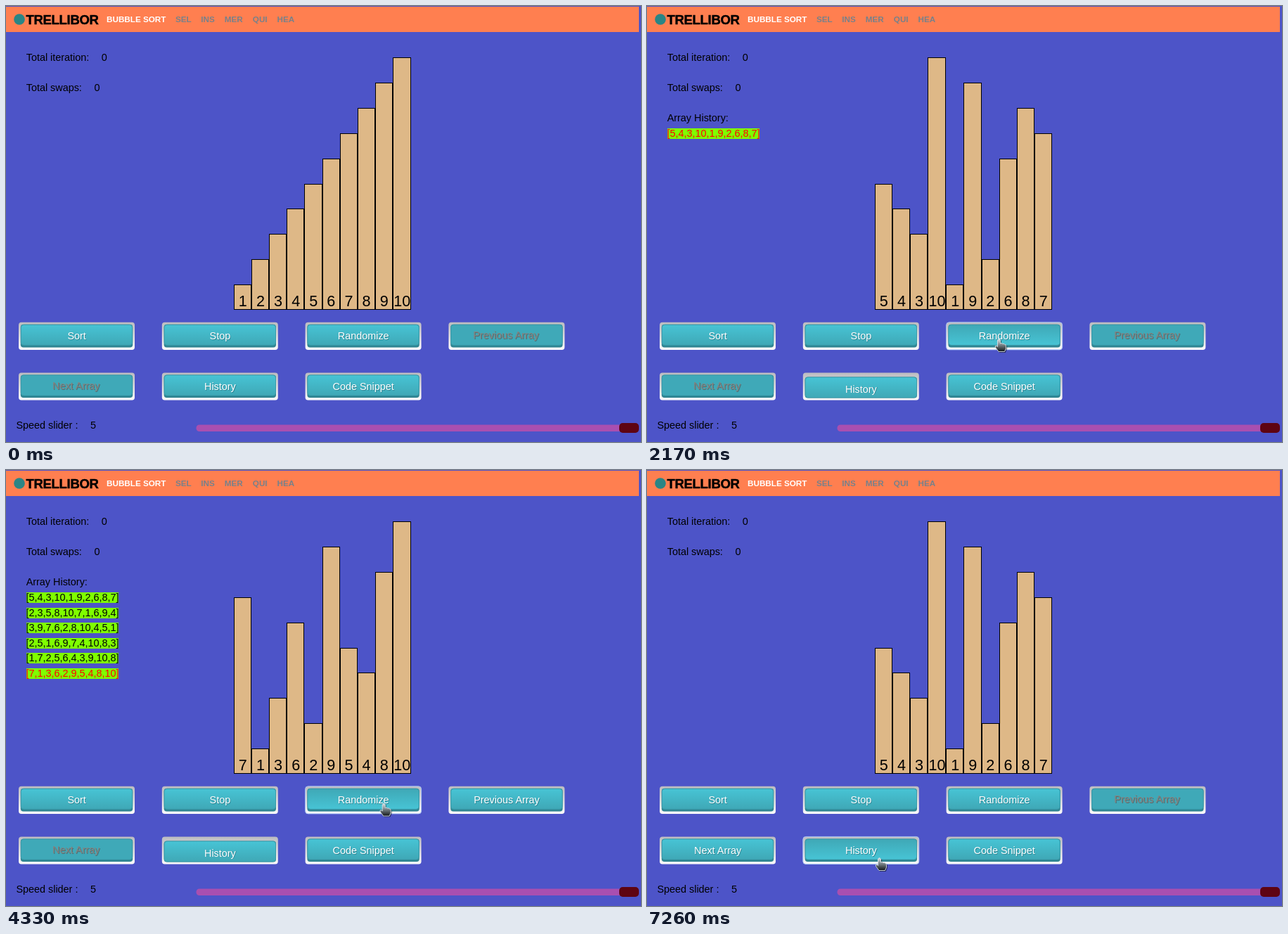
An HTML page for the animation above (8000 ms loop, 903 by 620 pixels).

```html
<!DOCTYPE html>
<html lang="en">
<head>
<meta charset="utf-8">
<title>Sorting visualizer</title>
<style>
  html, body { margin: 0; width: 903px; height: 620px; overflow: hidden; background: #4d54c8; }
  svg { display: block; font: 14.4px "Liberation Sans", Arial, sans-serif; }
  text { white-space: pre; }
  .mid { text-anchor: middle; }
  .nav { font-size: 11.7px; font-weight: bold; fill: #78818a; }
  .num { font-size: 21.6px; text-anchor: middle; }
  .brand { font-size: 18.5px; font-weight: bold; letter-spacing: -.3px; stroke: #000; stroke-width: .4; }
  .bar { fill: #deb887; stroke: #000; }
</style>
</head>
<body>
<svg width="903" height="620" viewBox="0 0 903 620">
  <defs>
    <linearGradient id="rim" x2="0" y2="1"><stop stop-color="#bcbcc0"/><stop offset="1" stop-color="#fafafa"/></linearGradient>
    <linearGradient id="up" x2="0" y2="1"><stop stop-color="#47c4d5"/><stop offset="1" stop-color="#3fa8b6"/></linearGradient>
    <linearGradient id="over" x2="0" y2="1"><stop stop-color="#3fa8b6"/><stop offset="1" stop-color="#47c4d5"/></linearGradient>
    <linearGradient id="glove" x2="0" y2="1"><stop stop-color="#dfe5e8"/><stop offset=".45" stop-color="#7d878c"/><stop offset="1" stop-color="#101416"/></linearGradient>
    <radialGradient id="spot"><stop stop-color="#e0e01c" stop-opacity=".85"/><stop offset=".8" stop-color="#cfe02c" stop-opacity=".7"/><stop offset="1" stop-color="#cfe02c" stop-opacity=".2"/></radialGradient>
  </defs>
  <path d="M0 1H900V37H0Z" fill="#ff7f50"/>
  <circle cx="19" cy="19" r="7.8" fill="#2b8585"/>
  <text class="brand" x="28.5" y="25.6">TRELLIBOR</text>
  <g class="nav">
    <text x="143" y="22.9" fill="#fff">BUBBLE SORT</text>
    <text x="241" y="22.9">SEL</text>
    <text x="277.3" y="22.9">INS</text>
    <text x="310.8" y="22.9">MER</text>
    <text x="350.8" y="22.9">QUI</text>
    <text x="385.6" y="22.9">HEA</text>
  </g>
  <text x="28.7" y="78">Total iteration:</text><text x="135.8" y="78">0</text>
  <text x="28.7" y="121">Total swaps:</text><text x="125.6" y="121">0</text>
  <text x="14.4" y="601.4">Speed slider :</text><text x="120" y="601.4">5</text>
  <rect x="270.5" y="595.5" width="629.5" height="9.5" rx="4.5" fill="#a94fb0"/>
  <rect x="872" y="593" width="28" height="14" rx="5" fill="#5e0412"/>
  <g id="scene"></g>
</svg>
<script>
const LOOP = 8000, TICK = 77.4;
const labels = ['Sort', 'Stop', 'Randomize', 'Previous Array', 'Next Array', 'History', 'Code Snippet'];
const [RANDOM, PREV, NEXT, HISTORY] = [2, 3, 4, 5];
const sorted = labels.concat(0, 0, 0).map((_, i) => i + 1);
const rows = ['5,4,3,10,1,9,2,6,8,7', '2,3,5,8,10,7,1,6,9,4', '3,9,7,6,2,8,10,4,5,1',
  '2,5,1,6,9,7,4,10,8,3', '1,7,2,5,6,4,3,9,10,8', '7,1,3,6,2,9,5,4,8,10'];

// Each press: time down, how long it is held; its effect comes on release.
const press = (down, held = 80) => ({ down, up: down + held });
const open = press(1310), close = press(7200, 60);
const shuffles = [press(2000, 170), press(2840), press(3240, 150), press(3480), press(3710), press(4020)];
const backs = [press(4710), press(5320), press(5640), press(6040, 150), press(6340)];
const presses = [open, ...shuffles, ...backs, close];
const released = (list, t) => list.filter(p => t >= p.up).length;

// The pointer glides from stop to stop; sag bends the way downwards.
const stops = [
  { x: 762, y: 602 },
  { from: 440, to: 1220, x: 292, y: 546 },
  { from: 1410, to: 1680, x: 501, y: 470 },
  { from: 4180, to: 4540, x: 710, y: 473 },
  { from: 6420, to: 7185, x: 331, y: 548, sag: 45 }
];
const clamp = u => Math.min(1, Math.max(0, u));
const ease = u => u < .5 ? 4 * u ** 3 : 1 - 4 * (1 - u) ** 3;

function pointer(t) {
  const s = 50 + Math.floor((t - 50) / TICK) * TICK;
  let { x, y } = stops[0];
  for (const p of stops.slice(1)) {
    const u = ease(clamp((s - p.from) / (p.to - p.from)));
    x += (p.x - x) * u;
    y += (p.y - y) * u + (p.sag || 0) * 4 * u * (1 - u);
  }
  return { x, y };
}

const corner = i => ({ x: 18 + 203.8 * (i % 4), y: i < 4 ? 449.8 : 521.4 });
const box = (x, y, w, h, look) => `<rect x="${x}" y="${y}" width="${w}" height="${h}" ${look}/>`;

function button(i, { off, hover, down, focus }) {
  const { x, y } = corner(i), top = y + (down ? 6 : 3);
  const face = off ? '#3fa9b8' : `url(#${hover ? 'over' : 'up'})`;
  const tx = x + 82.6, ty = y + 24.6 + (down ? 3.5 : 0);
  const label = (d, fill) => `<text class="mid" x="${tx + d}" y="${ty + d}" fill="${fill}">${labels[i]}</text>`;
  return box(x, y, 165, 39.2, 'rx="4" fill="url(#rim)"') +
    (focus ? box(x, y, 165, 39, 'rx="4" fill="none" stroke="#a9c4f5"') : '') +
    box(x + 2.8, top, 159.4, down ? 30 : 32.7, 'rx="4" fill="#2f8592"') +
    box(x + 3.3, top + .5, 158.4, 29, `rx="4" fill="${face}" stroke="#389baa" stroke-width=".8"`) +
    (off ? label(0, '#4d6e74') + label(-1, '#87827e') : label(.8, '#2f8592') + label(0, '#fff'));
}

function bars(list) {
  let s = '', left = 324;
  for (const n of list) {
    const right = left + (n > 9 ? 26 : 25.1);
    const x = Math.round(left), w = Math.round(right) - x, y = Math.round(432 - 35.9 * n);
    s += box(x + .5, y + .5, w - 1, 431 - y, 'class="bar"') +
      `<text class="num" x="${(left + right) / 2 + .3}" y="427.2">${n}</text>`;
    left = right;
  }
  return s;
}

function history(total, current) {
  return '<text x="28.7" y="164">Array History:</text>' + rows.slice(0, total).map((row, i) => {
    const y = Math.round(174 + 21.55 * i);
    return box(29, y, 131, 15, 'fill="#7fff00"') +
      `<text x="28.6" y="${y + 12}" fill="${i === current ? '#f00' : '#000'}">[${row}]</text>`;
  }).join('');
}

const HAND = 'M-2.5 5Q-.5 2 1.5 5V10Q3.5 8.5 4.8 10.5Q7 9.5 7.8 11.5Q9.5 11 9.5 13.5V17L7.5 21.5H-1L-5.5 15.5Q-6.5 12.5-4 13L-2.5 14.5Z';
const ARROW = 'M-.5-.5L16 10.5L8.5 12.5L4.8 20.8Z';

function cursor({ x, y }, hand, lit) {
  const shape = hand ? HAND : ARROW;
  return (lit ? `<circle cx="${x}" cy="${y}" r="8.7" fill="url(#spot)"/>` : '') +
    `<g transform="translate(${x} ${y})" stroke-linejoin="round">` +
    `<path d="${shape}" transform="translate(1 1)" fill="#0006" stroke="#0006"/>` +
    `<path d="${shape}" fill="${hand ? 'url(#glove)' : '#16222c'}" stroke="#d5dfe6" stroke-width=".9"/></g>`;
}

function focused(t) {
  if (t < open.down) return -1;
  if (t < shuffles[0].down) return HISTORY;
  if (t < backs[0].down) return RANDOM;
  if (t < backs.at(-1).up) return PREV;
  return t < close.down ? -1 : HISTORY;
}

function draw(t) {
  const total = released(shuffles, t), current = total - 1 - released(backs, t);
  const at = pointer(t), seen = t >= stops[1].from;
  const off = i => i === PREV ? current < 1 : i === NEXT && current >= total - 1;
  const over = labels.findIndex((_, i) => {
    const { x, y } = corner(i);
    return seen && !off(i) && at.x > x && at.x < x + 165 && at.y > y && at.y < y + 39;
  });
  let s = bars(total ? rows[current].split(',') : sorted);
  if (t >= open.up && t < close.up) s += history(total, current);
  s += labels.map((_, i) => button(i, {
    off: off(i), hover: i === over, focus: i === focused(t),
    down: i === HISTORY && t >= open.down && t < close.up
  })).join('');
  if (seen) s += cursor(at, over >= 0, presses.some(p => t >= p.down && t < p.up));
  return s;
}

const scene = document.getElementById('scene');
let shown = '', start;
function frame(now) {
  start ??= now;
  const next = draw((now - start) % LOOP);
  if (next !== shown) scene.innerHTML = shown = next;
  requestAnimationFrame(frame);
}
scene.innerHTML = shown = draw(0);
requestAnimationFrame(frame);
</script>
</body>
</html>
```
